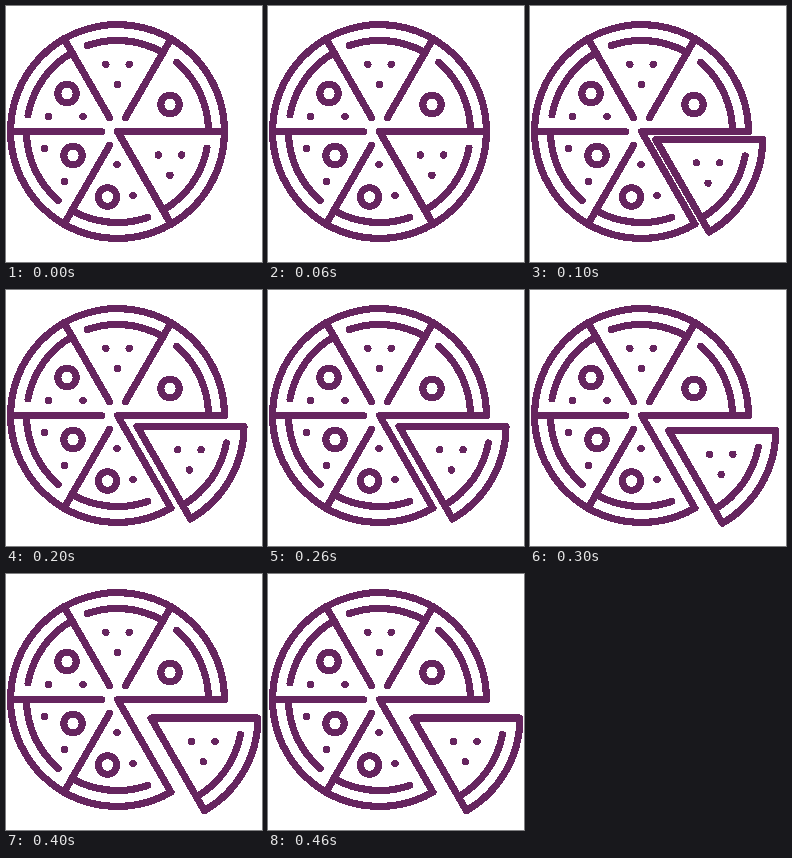
Recreate the animation shown at these times as an HTML page with a canvas. Size 256 px wide and 256 px high, loop 500 ms.

```html
<!DOCTYPE html>
<html lang="en">
<head>
<meta charset="utf-8">
<title>Pizza slice</title>
<style>
  html, body { margin: 0; width: 100%; height: 100%; overflow: hidden; background: #fff; }
  canvas { display: block; width: 256px; height: 256px; }
</style>
</head>
<body>
<canvas id="stage" width="256" height="256"></canvas>
<script>
const SIZE = 256;
const ctx = document.getElementById('stage').getContext('2d', { willReadFrequently: true });
const COLOR = '#66255f';
const CENTER = { x: 111.5, y: 125.5 };
const RADIUS = 107, CRUST = 91, TOPPING = 60.5;
const STEP = 100;
const SLIDE = [0, 16.2, 22.3, 31.2, 38.2];
const SLIDE_ANGLE = 29;

const polar = (deg, r) => {
  const a = deg * Math.PI / 180;
  return [r * Math.cos(a), r * Math.sin(a)];
};

// All shapes are placed relative to the middle of the pizza.
function arc(x, y, r, from = 0, to = 360) {
  ctx.arc(x, y, r, from * Math.PI / 180, to * Math.PI / 180);
}

function stroke(path) {
  ctx.beginPath();
  path();
  ctx.stroke();
}

function dot(x, y) {
  ctx.beginPath();
  arc(x, y, 3.7);
  ctx.fill();
}

const ring = (x, y) => stroke(() => arc(x, y, 9.2));

const crust = start => stroke(() => arc(0, 0, CRUST, start + 10.5, start + 60));

const spoke = deg => stroke(() => {
  ctx.moveTo(...polar(deg, 16));
  ctx.lineTo(...polar(deg, RADIUS));
});

const wedge = (from, to) => stroke(() => {
  ctx.moveTo(0, 0);
  arc(0, 0, RADIUS, from, to);
  ctx.closePath();
});

function dotTriangle(deg) {
  const [x, y] = polar(deg, TOPPING);
  for (let turn = 90; turn < 450; turn += 120) {
    const [dx, dy] = polar(turn, 13.5);
    dot(x + dx, y + dy);
  }
}

function ringWithDots(x, y, ...dots) {
  ring(x, y);
  dots.forEach(([dx, dy]) => dot(x + dx, y + dy));
}

function drawPizza() {
  wedge(60, 360);
  for (let deg = 60; deg < 360; deg += 60) {
    crust(deg);
    if (deg > 60) spoke(deg);
  }
  dotTriangle(270);
  ringWithDots(52.5, -27);
  ringWithDots(-50.5, -38, [-18.5, 23], [16, 23]);
  ringWithDots(-44.5, 24, [-28.5, -7], [-8.5, 26]);
  ringWithDots(-10, 65.5, [9.5, -32.5], [25.5, -1.5]);
}

function drawSlice() {
  wedge(0, 60);
  crust(0);
  dotTriangle(30);
}

// Gives every shape a hard, unsmoothed edge.
function sharpen() {
  const image = ctx.getImageData(0, 0, SIZE, SIZE);
  const rgb = [1, 3, 5].map(i => parseInt(COLOR.slice(i, i + 2), 16));
  for (let i = 0; i < image.data.length; i += 4) {
    image.data.set([...rgb, image.data[i + 3] > 127 ? 255 : 0], i);
  }
  ctx.putImageData(image, 0, 0);
}

function draw(step) {
  ctx.clearRect(0, 0, SIZE, SIZE);
  ctx.save();
  ctx.fillStyle = ctx.strokeStyle = COLOR;
  ctx.lineWidth = 7.1;
  ctx.lineCap = ctx.lineJoin = 'round';
  ctx.translate(CENTER.x, CENTER.y);
  drawPizza();
  ctx.translate(...polar(SLIDE_ANGLE, SLIDE[step]));
  drawSlice();
  ctx.restore();
  sharpen();
}

const start = performance.now();
let shown = -1;
function tick() {
  const step = Math.floor((performance.now() - start) / STEP) % SLIDE.length;
  if (step !== shown) draw(shown = step);
  requestAnimationFrame(tick);
}
tick();
</script>
</body>
</html>
```
